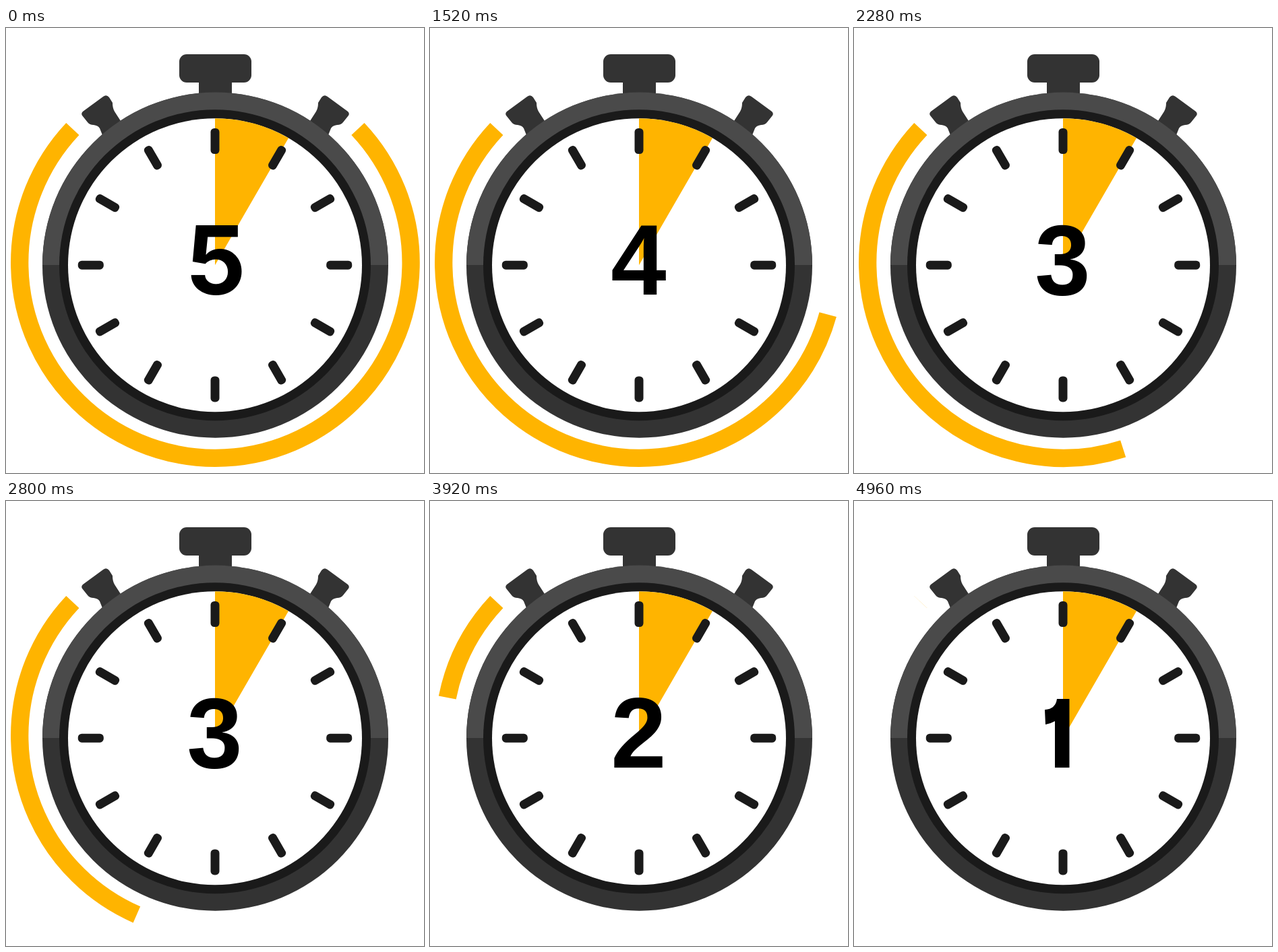
An HTML page that plays this animation: 620 px wide and 661 px high, repeating every 5000 ms.

```html
<!DOCTYPE html>
<html lang="en">
<head>
<meta charset="utf-8">
<title>Five second countdown</title>
<style>
  html, body { margin: 0; width: 100%; height: 100%; overflow: hidden; background: #fff; }
  svg { display: block; width: 620px; height: 661px; }
  .digit { font: bold 148px "Liberation Sans", Arial, sans-serif; text-anchor: middle; }
  .wide { font: bold 141px Inter, sans-serif; }
</style>
</head>
<body>
<svg viewBox="0 0 620 661">
  <defs>
    <path id="knob" d="M114 124L144 102Q149 98 153 103L158 111Q158 119 161 124L170 138L143 159L139 149Q137 145 130 144Q124 144 121 140L113 130Q111 127 114 124Z"/>
  </defs>
  <g fill="#333">
    <rect x="257" y="39" width="107" height="42" rx="11"/>
    <rect x="286" y="78" width="49" height="30"/>
    <use href="#knob"/>
    <use href="#knob" transform="matrix(-1 0 0 1 621 0)"/>
    <circle cx="310.5" cy="352.3" r="256.5"/>
  </g>
  <path d="M54 352a256.5 256.5 0 0 1 513 0z" fill="#4a4a4a"/>
  <circle cx="310" cy="352.2" r="231" fill="#1a1a1a"/>
  <circle cx="310" cy="352.2" r="218" fill="#fff"/>
  <path d="M310 352.2v-218a218 218 0 0 1 109 29.2z" fill="#ffb400"/>
  <g id="ticks" fill="#1a1a1a"></g>
  <path id="ring" fill="none" stroke="#ffb400" stroke-width="26.3" pathLength="1" stroke-dasharray="1 2"/>
  <g id="digits">
    <text class="digit wide" x="312" y="396">5</text>
    <text class="digit" x="309.5" y="396">4</text>
    <text class="digit" x="309.5" y="396">3</text>
    <text class="digit" x="309.5" y="396">2</text>
    <path d="M301 294H319.500V396H298V327Q291 331 284 332L283 310Q299 309 301 294Z"/>
  </g>
</svg>
<script>
  const LOOP = { duration: 5000, iterations: Infinity };
  const START = 0.0016;
  const RING = { x: 310.4, y: 348.6, r: 290.2, half: 46.8 * Math.PI / 180 };

  const ticks = document.getElementById('ticks');
  for (let i = 0; i < 12; i++) {
    const tick = document.createElementNS('http://www.w3.org/2000/svg', 'rect');
    const attrs = { x: 303.5, y: 149, width: 13, height: 38, rx: 5.5, transform: `rotate(${i * 30} 310 352.2)` };
    for (const key in attrs) tick.setAttribute(key, attrs[key]);
    ticks.append(tick);
  }

  // Drawn from the fixed left end, so the right end retreats clockwise.
  const ring = document.getElementById('ring');
  const dx = RING.r * Math.sin(RING.half);
  const y = RING.y - RING.r * Math.cos(RING.half);
  ring.setAttribute('d', `M${RING.x - dx} ${y}A${RING.r} ${RING.r} 0 1 0 ${RING.x + dx} ${y}`);
  ring.animate([
    { strokeDashoffset: 0, offset: 0 },
    { strokeDashoffset: 0, offset: START, easing: 'cubic-bezier(.3333, 0, .6667, 1)' },
    { strokeDashoffset: 1, offset: 1 }
  ], LOOP);

  const steps = [...document.getElementById('digits').children];
  steps.forEach((digit, i) => {
    const from = i / steps.length, to = (i + 1) / steps.length;
    digit.animate([
      { opacity: 0, offset: 0 },
      { opacity: 0, offset: from },
      { opacity: 1, offset: from },
      { opacity: 1, offset: to },
      { opacity: 0, offset: to },
      { opacity: 0, offset: 1 }
    ], LOOP);
  });
</script>
</body>
</html>
```
